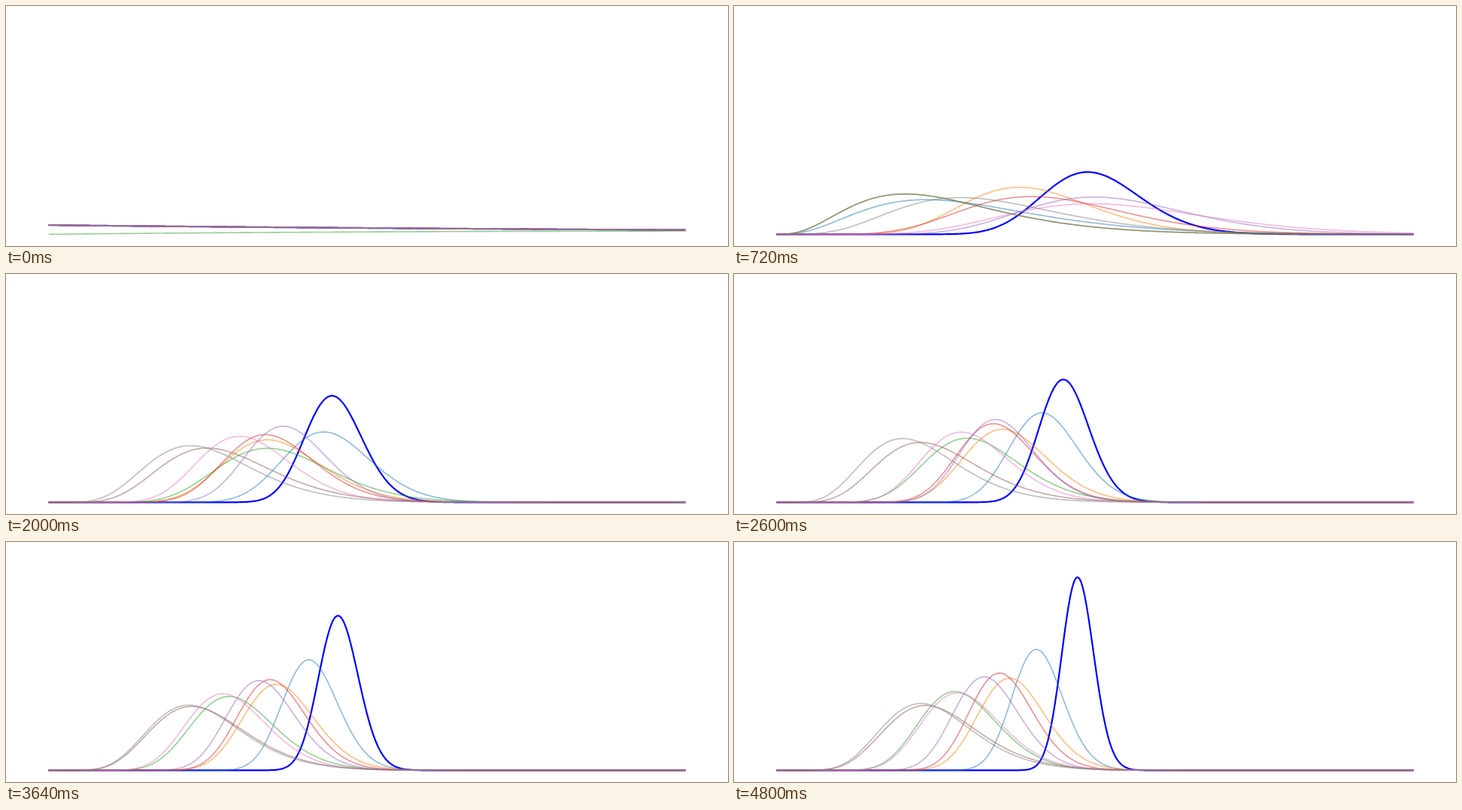
Recreate the animation shown at these times as an HTML page with a canvas. Size 960x320 px, loop 4.82 s.

```html
<!DOCTYPE html>
<html lang="en">
<head>
<meta charset="utf-8">
<title>Gamma posteriors</title>
<style>
  html, body { margin: 0; width: 100%; height: 100%; overflow: hidden; background: #fff; }
  canvas { display: block; width: 960px; height: 320px; }
</style>
</head>
<body>
<canvas id="stage" width="960" height="320"></canvas>
<script>
const ctx = document.getElementById('stage').getContext('2d');

const LEFT = 57.5, WIDTH = 845, BASE = 304.4;
const AREA = 13600;       // pixel area under every density
const STEP_MS = 20, STEPS = 241;
const BUDGET = 0.00812;   // exposure shared by all arms in each step

// Weaker arms: colour, event counts at the knots, modes (px) from the second knot on.
const KNOTS = [0, 36, 100, 240];
const arms = [
  ['#1f77b4', [0, 3, 40, 105], [198, 365, 344.5]],
  ['#ff7f0e', [0, 14, 20, 49], [322, 290, 309]],
  ['#2ca02c', [1, 3, 15, 21], [170, 290, 236]],
  ['#d62728', [0, 10, 23, 50], [338, 287.5, 295.5]],
  ['#9467bd', [0, 15, 34, 40], [421.5, 311, 275]],
  ['#8c564b', [0, 3, 8, 10], [170, 210, 197]],
  ['#e377c2', [0, 10, 17, 21], [418, 253, 240]],
  ['#7f7f7f', [0, 5, 7, 10], [244, 188, 191]]
].map(([color, counts, modes]) => ({
  color, counts,
  rates: [BUDGET / 9, ...modes.map((mode, i) => counts[i + 1] / mode)]
}));

// The best arm only has a wandering mode; its exposure is what the others leave.
const BEST_KNOTS = [0, 36, 64, 100, 161, 203, 240];
const BEST_MODES = [413, 413, 427, 376, 385, 383, 399];

const logFact = [0];
for (let n = 1; n < 400; n++) logFact[n] = logFact[n - 1] + Math.log(n);

const linear = f => f;
const fade = f => 1 - (1 - f) ** 1.55;   // exploration slows down

function interpolate(knots, values, step, lastEase = linear) {
  let i = 1;
  while (step > knots[i]) i++;
  const ease = i === knots.length - 1 ? lastEase : linear;
  const f = ease((step - knots[i - 1]) / (knots[i] - knots[i - 1]));
  return values[i - 1] + (values[i] - values[i - 1]) * f;
}

function drawDensity(count, rate, color, width, alpha) {
  const norm = (count + 1) * Math.log(rate) - logFact[count];
  ctx.beginPath();
  for (let i = 0; i <= 500; i++) {
    const x = Math.max(WIDTH * i / 500, 1e-9);
    const density = Math.exp(norm + count * Math.log(x) - rate * x);
    ctx.lineTo(LEFT + x, BASE - AREA * density);
  }
  ctx.strokeStyle = color;
  ctx.lineWidth = width;
  ctx.globalAlpha = alpha;
  ctx.stroke();
}

function draw(step) {
  ctx.globalAlpha = 1;
  ctx.fillStyle = '#fff';
  ctx.fillRect(0, 0, 960, 320);

  const rates = arms.map(arm => interpolate(KNOTS, arm.rates, step, fade));
  const bestRate = rates.reduce((left, rate) => left - rate, BUDGET * (step + 1));
  const bestMode = interpolate(BEST_KNOTS, BEST_MODES, step);
  drawDensity(Math.round(bestMode * bestRate), bestRate, '#0000ff', 2.2, 1);

  arms.forEach((arm, i) => {
    const count = Math.floor(interpolate(KNOTS, arm.counts, step, fade));
    drawDensity(count, rates[i], arm.color, 1.6, 0.5);
  });
}

ctx.lineJoin = 'round';
ctx.lineCap = 'square';

let shown = -1;
const start = performance.now();
function tick() {
  const elapsed = Math.max(performance.now() - start, 0);
  const step = Math.floor(elapsed / STEP_MS) % STEPS;
  if (step !== shown) draw(shown = step);
  requestAnimationFrame(tick);
}
tick();
</script>
</body>
</html>
```
